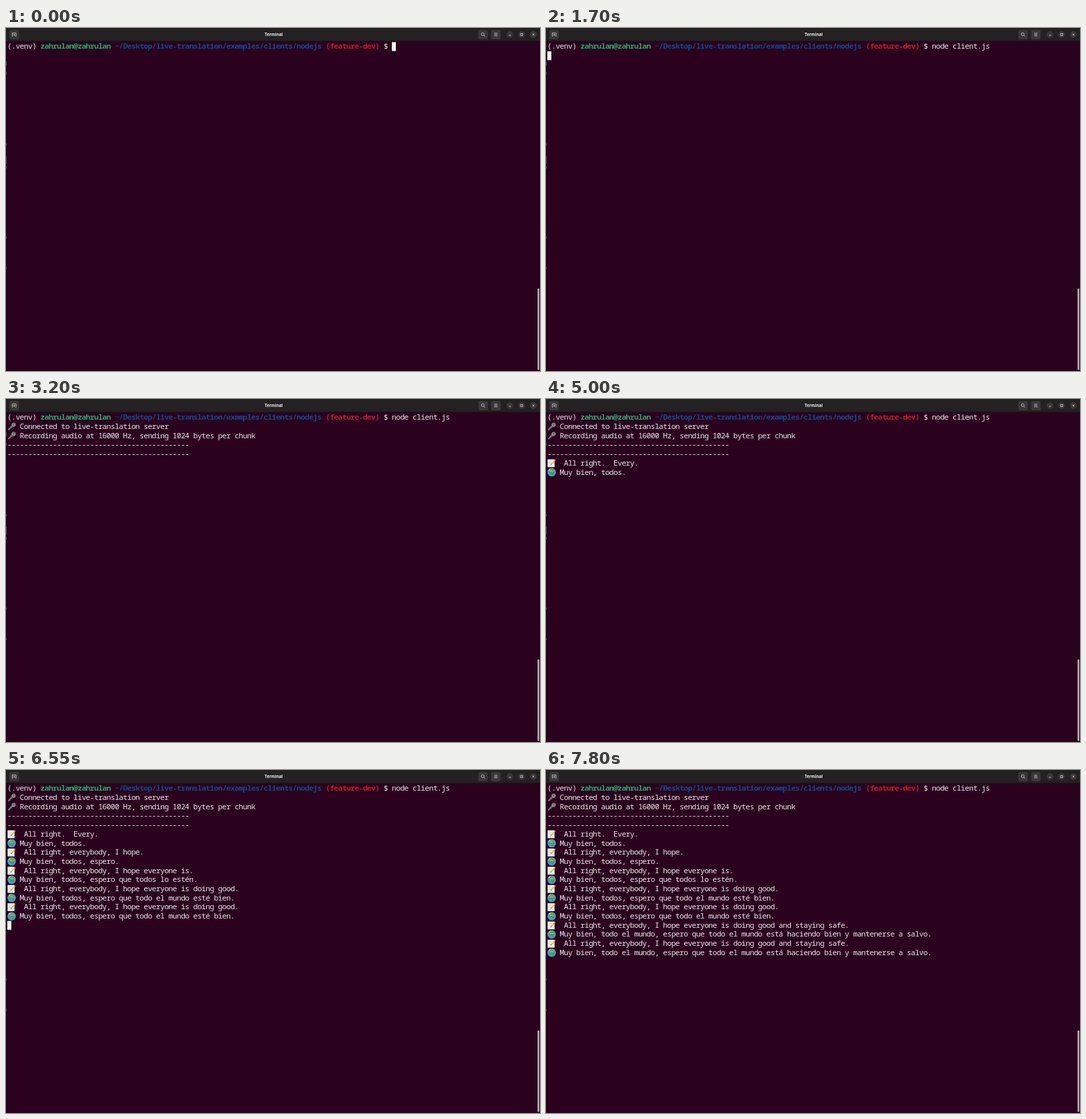
An HTML page that plays this animation: 800x515 px, repeating every 8000 ms.

```html
<!DOCTYPE html>
<html lang="en">
<head>
<meta charset="utf-8">
<title>Terminal</title>
<style>
  html, body { margin: 0; width: 100%; height: 100%; overflow: hidden; background: #2a021e; }
  svg { display: block; }
  .line { font: 11.4px "Noto Sans Mono", monospace; letter-spacing: -.646px; white-space: pre; fill: #e9e5e8; }
  .b { font-weight: 700; }
  .user { fill: #26a96a; }
  .path { fill: #12488b; }
  .branch { fill: #c01c28; }
  .title { font: 700 6.1px "Open Sans", "Noto Sans", sans-serif; fill: #f2f2f2; text-anchor: middle; }
  .btn { fill: #393737; }
  .ico { fill: none; stroke: #d0d0d0; stroke-width: .8; }
</style>
</head>
<body>
<svg width="800" height="515" viewBox="0 0 800 515">
  <defs>
    <symbol id="mic" viewBox="0 0 13 13" overflow="visible">
      <path d="M6.6 4.6 8.8 6.8 2.2 12.4 .8 11Z" fill="#5f5d60"/>
      <path d="M6.2 5 7 5.8 1.6 11.6 .8 11Z" fill="#8d8b8e"/>
      <circle cx="9.6" cy="3.6" r="3.1" fill="#858386"/>
      <path d="M7.3 1.8 11.4 5.9M9.2.7 12.4 3.9M11.4 1.4 7.4 5.4" stroke="#5d5b5f" stroke-width=".6"/>
      <path d="M6.5 3.5 9.8 6.8" stroke="#b4b2b5" stroke-width=".9"/>
    </symbol>
    <symbol id="memo" viewBox="0 0 13 13" overflow="visible">
      <path d="M.4 .8H10.8V12.6H.4Z" fill="#f6f5f4"/>
      <path d="M1.8 3.2H8M1.8 5.2H6.8M1.8 7.2H5.4M1.8 10.6H9" stroke="#b3bcc2" stroke-width=".6"/>
      <path d="M4.8 9.2 5.4 7.4 10.8 1.9 12 3.1 6.6 8.6Z" fill="#f2a92b"/>
      <path d="M4.8 9.2 5.4 7.4 6.6 8.6Z" fill="#5b4a42"/>
      <path d="M10.8 1.9 11.6 1.1Q12.6 1.2 12.8 2.3L12 3.1Z" fill="#d9505c"/>
    </symbol>
    <symbol id="globe" viewBox="0 0 13 13" overflow="visible">
      <circle cx="6.5" cy="6.5" r="6.3" fill="#3f9fd8"/>
      <path d="M1.2 4.2A6 6 0 0 1 5 .9L4.2 3.2Z" fill="#a9d6ee"/>
      <path d="M4.4 2.2 6.4 .6 10 1.5 11.6 3.4 9.4 3.7 7.4 3.2 5.4 3.9 4 3.6Z" fill="#6fa548"/>
      <path d="M2.8 5 5 4.5 8.8 4.9 10 6.9 11 7.1 9.4 9.2 8.6 11.1 7.3 11.6 6.3 8.5 3.4 7.8 2.4 6.4Z" fill="#5a9640"/>
      <path d="M3.2 5.2 5 4.5 8.8 4.9 9.3 5.8 5.4 6Z" fill="#c3b871"/>
    </symbol>
  </defs>

  <rect width="800" height="515" fill="#2a021e"/>
  <rect y="20" width="1" height="495" fill="#1f0a19"/>
  <path d="M.5 313V316M.5 359V362" stroke="#31503a"/>
  <g id="behind">
    <path d="M.5 50V56M.5 66V70M.5 173V176" stroke="#31503a"/>
    <path d="M.5 192V204M.5 207V211" stroke="#55404f"/>
  </g>

  <rect width="800" height="20" fill="#232122"/>
  <rect y="19.4" width="800" height=".8" fill="#171115"/>
  <text class="title" x="401" y="11.9">Terminal</text>
  <g class="btn">
    <rect x="5" y="3" width="14.4" height="14" rx="2.6"/>
    <rect x="707.6" y="3" width="14.4" height="14" rx="2.6"/>
    <rect x="726.6" y="3" width="14.4" height="14" rx="2.6"/>
    <circle cx="755" cy="9.8" r="5"/>
    <circle cx="772.5" cy="9.8" r="5"/>
    <circle cx="790" cy="9.8" r="5"/>
  </g>
  <g class="ico">
    <path d="M10.2 12.4H9.4V7.4H15V12.4H14.2M12.2 8.6V11.8M10.6 10.2H13.8"/>
    <circle cx="714.2" cy="9.3" r="2.1"/>
    <path d="M715.8 10.9 717.7 12.8"/>
    <path d="M731.4 7.8H736.2M731.4 9.8H736.2M731.4 11.8H736.2"/>
    <path d="M753.4 11H756.6"/>
    <rect x="771" y="8.3" width="3" height="3"/>
    <path d="M788.5 8.3 791.5 11.3M791.5 8.3 788.5 11.3"/>
  </g>

  <g id="screen"></g>
  <rect id="cursor" width="6" height="13.2" fill="#fff"/>
  <rect x="796.4" y="391" width="2.5" height="122.5" rx="1.2" fill="#bfb6bc"/>
</svg>

<script>
const LOOP = 8000, CELL = 6.194, ROW = 13.69, LEFT = 2, TOP = 21.1, BASE = 10.3;
const PROMPT_COLS = 93, ENTER = 1700, COVERED = 5800;

const prompt = [
  ["(.venv) ", ""],
  ["zahrulan@zahrulan ", "b user"],
  ["~/Desktop/live-translation/examples/clients/nodejs ", "b path"],
  ["(feature-dev) ", "b branch"],
  ["$ ", ""]
];

// [time, text typed so far]
const typing = [
  [0, ""], [150, "n"], [250, "no"], [300, "nod"], [400, "node"], [450, "node "],
  [1200, "node c"], [1250, "node cl"], [1350, "node cli"], [1450, "node client.js "]
];

const good = "All right, everybody, I hope everyone is doing good";
const bien = "Muy bien, todos, espero que todo el mundo esté bien.";
const salvo = "Muy bien, todo el mundo, espero que todo el mundo está haciendo bien y mantenerse a salvo.";

// [time, heard, translated]
const phrases = [
  [4500, "All right.  Every.", "Muy bien, todos."],
  [5050, "All right, everybody, I hope.", "Muy bien, todos, espero."],
  [5800, "All right, everybody, I hope everyone is.", "Muy bien, todos, espero que todos lo estén."],
  [6250, good + ".", bien],
  [6400, good + ".", bien],
  [7050, good + " and staying safe.", salvo],
  [7400, good + " and staying safe.", salvo]
];

// [time, icon, text]
const output = [
  [1800, "mic", "Connected to live-translation server"],
  [1900, "mic", "Recording audio at 16000 Hz, sending 1024 bytes per chunk"],
  [1950, "", "-".repeat(44)],
  [1950, "", "-".repeat(44)],
  ...phrases.flatMap(([t, en, es]) => [[t, "memo", " " + en], [t, "globe", es]])
];

// The cursor starts lit and flips at each time.
const blinks = [
  750, 1050, 2000, 2300, 2600, 2900, 3200, 3500, 3850, 4150, 4400,
  4700, 5000, 5300, 5600, 5900, 6200, 6500, 6850, 7150, 7800
];

const screen = document.getElementById("screen");
const cursor = document.getElementById("cursor");
const behind = document.getElementById("behind");

function add(parent, tag, attrs, text = "") {
  const el = document.createElementNS("http://www.w3.org/2000/svg", tag);
  for (const key in attrs) el.setAttribute(key, attrs[key]);
  el.textContent = text;
  return parent.appendChild(el);
}

const colX = col => LEFT + col * CELL;
const rowY = row => TOP + row * ROW;
const addText = (parent, row, col, text, cls = "") =>
  add(parent, "text", { class: "line " + cls, x: colX(col), y: rowY(row) + BASE }, text);

let col = 0;
for (const [text, cls] of prompt) {
  addText(screen, 0, col, text, cls);
  col += text.length;
}
const command = addText(screen, 0, PROMPT_COLS, "");

const lines = output.map(([time, icon, text], i) => {
  const el = add(screen, "g", {});
  if (icon) add(el, "use", { href: "#" + icon, x: LEFT, y: rowY(i + 1) + .2, width: 13, height: 13 });
  addText(el, i + 1, icon ? 3 : 0, text);
  return { time, el };
});

const show = (el, on) => el.setAttribute("visibility", on ? "visible" : "hidden");

function draw(t) {
  const typed = typing.filter(s => s[0] <= t).pop()[1];
  if (command.textContent !== typed) command.textContent = typed;

  let row = t < ENTER ? 0 : 1;
  for (const { time, el } of lines) {
    show(el, t >= time);
    if (t >= time) row++;
  }
  cursor.setAttribute("x", colX(row ? 0 : PROMPT_COLS + typed.length));
  cursor.setAttribute("y", rowY(row) + .2);
  show(cursor, blinks.filter(b => b <= t).length % 2 === 0);
  show(behind, t < COVERED);
}

const start = performance.now();
function frame() {
  draw((performance.now() - start) % LOOP);
  requestAnimationFrame(frame);
}
frame();
</script>
</body>
</html>
```
